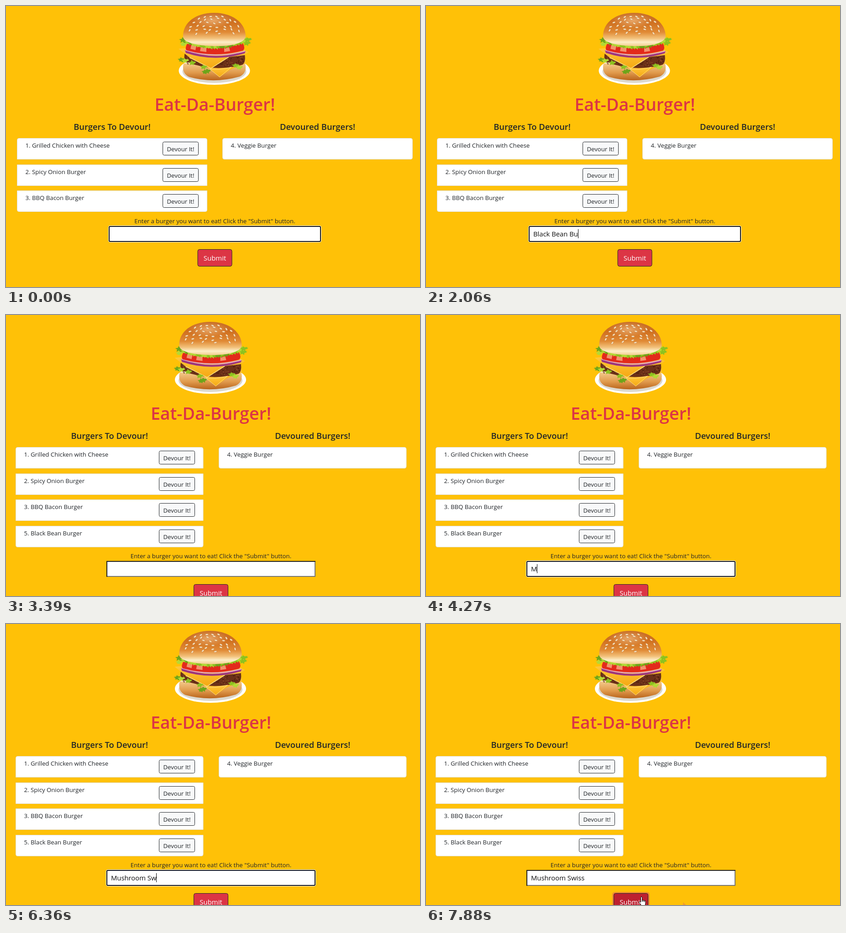
An HTML page that plays this animation: 907x617 px, repeating every 8 s.

```html
<!DOCTYPE html>
<html lang="en">
<head>
<meta charset="utf-8">
<title>Burger list</title>
<style>
  html, body { margin: 0; width: 100%; height: 100%; overflow: hidden; background: #ffc107; }
  svg { display: block; width: 907px; height: 617px; }
  text { font-family: "Open Sans", "Noto Sans", sans-serif; font-size: 13.2px; fill: #212529; white-space: pre; }
  .mid { text-anchor: middle; }
  .title { font-size: 37.5px; font-weight: 600; fill: #dc3545; }
  .head { font-size: 18.4px; font-weight: 600; }
  .typed { font-size: 14.8px; fill: #111; }
  .submit { font-size: 14.9px; fill: #fff; }
</style>
</head>
<body>
<svg id="stage" viewBox="0 0 907 617">
  <defs>
    <linearGradient id="crown" x1="0" y1="0" x2="0" y2="1">
      <stop offset="0" stop-color="#c8702a"/>
      <stop offset=".28" stop-color="#cf6f1f"/>
      <stop offset=".58" stop-color="#e08a35"/>
      <stop offset=".76" stop-color="#f2bf78"/>
      <stop offset=".88" stop-color="#fdeec8"/>
      <stop offset="1" stop-color="#f3cd8d"/>
    </linearGradient>
    <linearGradient id="heel" x1="0" y1="0" x2="0" y2="1">
      <stop offset="0" stop-color="#f3c98a"/>
      <stop offset=".55" stop-color="#e09a4c"/>
      <stop offset="1" stop-color="#b9641c"/>
    </linearGradient>
    <linearGradient id="cheese" x1="0" y1="0" x2="0" y2="1">
      <stop offset="0" stop-color="#ffc83c"/>
      <stop offset="1" stop-color="#f5a812"/>
    </linearGradient>
    <radialGradient id="glow">
      <stop offset="0" stop-color="#f3c089" stop-opacity=".7"/>
      <stop offset="1" stop-color="#f3c089" stop-opacity="0"/>
    </radialGradient>
    <g id="burger">
      <ellipse cx="456.5" cy="142" rx="78" ry="31" fill="#fff"/>
      <ellipse cx="456.5" cy="144" rx="70" ry="25" fill="#dcd8cd"/>
      <path d="M389 126Q384 148 402 156Q456 171 512 155Q529 147 524 126Z" fill="url(#heel)"/>
      <path d="M380 119L394 113H523L526 126L491 140L468 156L446 137L398 124Z" fill="url(#cheese)"/>
      <path d="M392 102Q388 120 396 123Q456 146 518 129Q527 122 522 102Z" fill="#6b3018"/>
      <g id="crumbs"/>
      <path d="M446 138L468 156L494 134Q470 141 446 138Z" fill="url(#cheese)" stroke="#ffe184"/>
      <path d="M378 94L396 92L520 95L532 101L522 108L488 112L449 137L402 113Z" fill="url(#cheese)"/>
      <path d="M402 113L449 137L488 112" fill="none" stroke="#ffe07a" stroke-width="1.5"/>
      <path d="M392 97Q456 121 525 99L523 104Q457 124 394 103Z" fill="#9c3580"/>
      <path d="M393 97Q456 117 524 99" fill="none" stroke="#dfa6cf" stroke-width="2"/>
      <path d="M397 82Q390 97 398 98Q457 114 519 98Q525 93 519 82Z" fill="#e32a1b"/>
      <path d="M404 94l11 3 2-9-11-2zM425 99l14 2V91l-12-1zM478 101l13-2-2-8-11 2z" fill="#f4916c"/>
      <g id="lettuce"/>
      <path d="M388 67C387 38 414 15 456 15S524 38 525 65C526 80 497 89 456 88S388 80 388 67Z" fill="url(#crown)"/>
      <ellipse cx="452" cy="32" rx="43" ry="16" fill="url(#glow)"/>
      <g id="seeds" fill="#f8e6c3" stroke="#b86a2a" stroke-width=".5"/>
    </g>
  </defs>
  <rect width="907" height="617" fill="#ffc107"/>
</svg>
<script>
const LOOP = 8000, SWITCH = 3390, FOCUS = 4100, PRESS = 7796;
const stage = document.getElementById('stage');
const clamp = v => Math.max(0, Math.min(1, v));

function add(parent, tag, attrs, text) {
  const el = document.createElementNS('http://www.w3.org/2000/svg', tag);
  for (const key in attrs) el.setAttribute(key, attrs[key]);
  if (text) el.textContent = text;
  parent.append(el);
  return el;
}
const show = (el, on) => el.setAttribute('visibility', on ? 'visible' : 'hidden');

let seed = 7;
const random = () => (seed = seed * 16807 % 2147483647) / 2147483647;
const around = (v, spread) => v + (random() - .5) * spread;

function garnishBurger() {
  const seeds = document.getElementById('seeds');
  [[22, 4, 24], [29, 6, 42], [37, 7, 51], [45, 8, 58], [53, 8, 60], [60, 4, 55]].forEach(([y, count, half]) => {
    for (let i = 0; i < count; i++) {
      const cx = around(456 + half * (2 * (i + .5) / count - 1), 5), cy = around(y, 5);
      add(seeds, 'ellipse', { cx, cy, rx: 3.4, ry: 1.7, transform: `rotate(${around((cx - 456) * .9, 70)} ${cx} ${cy})` });
    }
  });
  const crumbs = document.getElementById('crumbs');
  for (let i = 0; i < 90; i++) {
    const cx = around(457, 126), cy = around(120, 20) + 4 - Math.abs(cx - 457) * .08;
    add(crumbs, 'circle', { cx, cy, r: 1.2, fill: i % 2 ? '#8d4a2a' : '#4a1d0d' });
  }
  const lettuce = document.getElementById('lettuce');
  const leaf = (x, y, size) => {
    const points = [];
    for (let i = 0; i < 11; i++) {
      const a = i * Math.PI * 2 / 11, r = size * (i % 2 ? .55 : around(1, .4));
      points.push([x + r * Math.cos(a), y + r * .75 * Math.sin(a)]);
    }
    add(lettuce, 'polygon', { points: points.join(' '), fill: ['#8dc21f', '#6da51a', '#b3d935'][Math.floor(random() * 3)] });
  };
  for (let i = 0; i < 24; i++) {
    const k = i / 11.5 - 1;
    leaf(457 + 69 * k, 89 - 14 * k * k, 8.5);
  }
  [[529, 74], [527, 82], [388, 84], [384, 118], [392, 120], [408, 125], [433, 134], [441, 143], [436, 145], [503, 131], [511, 135]]
    .forEach(([x, y]) => leaf(x, y, 8));
}

function card(parent, x, y, w, top, bottom) {
  const h = 47, a = top ? 4 : 0, b = bottom ? 4 : 0;
  add(parent, 'path', {
    d: `M${x + .5} ${y + .5 + a}q0 ${-a} ${a} ${-a}h${w - 1 - 2 * a}q${a} 0 ${a} ${a}v${h - 1 - a - b}` +
       `q0 ${b} ${-b} ${b}h${2 * b + 1 - w}q${-b} 0 ${-b} ${-b}z`,
    fill: '#fff', stroke: '#dfdfdf'
  });
}

function buildPage(o) {
  const page = add(stage, 'g');
  const text = (x, y, cls, value) => add(page, 'text', { x, y, class: cls }, value);
  add(page, 'use', { href: '#burger', x: o.mid - 457.5 });
  text(o.mid, 229.5, 'mid title', 'Eat-Da-Burger!');
  text(o.left + o.width / 2, 272, 'mid head', 'Burgers To Devour!');
  text(o.right + o.width / 2, 272, 'mid head', 'Devoured Burgers!');
  o.items.forEach((item, i) => {
    const shift = Math.round(57.5 * i), y = 290 + shift;
    card(page, o.left, y, o.width, i === 0, i === o.items.length - 1);
    text(o.left + 18.5, y + 21, '', item);
    add(page, 'rect', { x: o.button + .5, y: y + 8.5, width: 78, height: 29, rx: 3, fill: '#f8f9fa', stroke: '#212529' });
    text(o.button + 39.5, y + 29, 'mid', 'Devour It!');
  });
  card(page, o.right, 290, o.width, true, true);
  text(o.right + 18.5, 311, '', '4. Veggie Burger');

  const { x, y, w } = o.input;
  text(o.mid, y - 6, 'mid', 'Enter a burger you want to eat! Click the "Submit" button.');
  add(page, 'rect', { x, y, width: w, height: 35, fill: '#fff' });
  const plain = add(page, 'g', { fill: 'none', 'stroke-width': 2 });
  add(plain, 'path', { d: `M${x} ${y + 34}h${w - 1}v-34`, stroke: '#767676' });
  add(plain, 'path', { d: `M${x + 1} ${y + 35}v-34h${w - 1}`, stroke: '#202020' });
  const ring = add(page, 'g', { fill: 'none' });
  add(ring, 'rect', { x: x - .5, y: y - .5, width: w + 1, height: 36, rx: 3.5, stroke: '#fff' });
  add(ring, 'rect', { x: x + 1, y: y + 1, width: w - 2, height: 33, rx: 2, stroke: '#101010', 'stroke-width': 2 });
  const typed = text(x + 10, y + 23, 'typed');
  const caret = add(page, 'rect', { y: y + 7, width: 1, height: 20 });

  const top = y + 51.5, glow = add(page, 'rect', {
    x: o.mid - 41, y: top - 3, width: 82, height: 44, rx: 6, fill: '#f08a34'
  });
  const submit = add(page, 'rect', { x: o.mid - 37.5, y: top, width: 75, height: 37, rx: 4, stroke: '#212529' });
  text(o.mid, y + 75.5, 'mid submit', 'Submit');
  return { page, plain, ring, typed, caret, glow, submit, start: x + 10 };
}

garnishBurger();
const items = ['1. Grilled Chicken with Cheese', '2. Spicy Onion Burger', '3. BBQ Bacon Burger'];
const before = buildPage({
  mid: 457.5, left: 24, right: 474, width: 417, button: 343, items, input: { x: 225, y: 483, w: 465 }
});
const after = buildPage({
  mid: 449, left: 21, right: 466, width: 411.5, button: 335,
  items: [...items, '5. Black Bean Burger'], input: { x: 220, y: 540, w: 458 }
});

const trace = add(stage, 'path', { d: 'M563 611L570 617H563Z', fill: '#f39a2c' });
const pointer = { fill: '#fff', stroke: '#000' };
const arrow = add(stage, 'path', { ...pointer, d: 'M0 0V16L4 12.5 6.5 18 9 17 6.5 11.5H11.5Z' });
const hand = add(stage, 'path', {
  ...pointer,
  d: 'M-1.5 1.5q0-1.5 1.5-1.5t1.5 1.5V8q1-1 2.5 0 1.5-1 2.5.5 2-.5 2.5 1.5v4q0 3-2 6H.5Q-2.5 15-5 12.5q-.8-2 1-2L-1.5 12ZM1.5 8v3M4 8v3M6.5 8.5v3'
});

// Times at which each letter arrives
const spread = (from, to, n) => Array.from({ length: n }, (_, i) => from + (to - from) * i / (n - 1));
const typing = {
  first: { word: 'Black Bean Burger', from: 150, keys: [...spread(270, 1140, 8), 1290, 1400, 1510, ...spread(1830, 2310, 4), 2620, 2690] },
  second: { word: 'Mushroom Swiss', from: FOCUS, keys: [...spread(4250, 5140, 7), 5440, 5750, 6130, 6360, 6530, 6660, 6800] }
};
const ruler = document.createElement('canvas').getContext('2d');
ruler.font = '14.8px "Open Sans", "Noto Sans", sans-serif';

function drawInput(view, { word, from, keys }, t, focused) {
  const done = keys.filter(k => k <= t), value = word.slice(0, done.length);
  const last = done.length ? done[done.length - 1] : from;
  view.typed.textContent = value;
  view.caret.setAttribute('x', Math.round(view.start + ruler.measureText(value).width));
  show(view.caret, focused && t >= from && t - last < 540);
  show(view.ring, focused);
  show(view.plain, !focused);
}

function drawPointer(t) {
  const step = Math.floor((t - 7126) / 84) * 84;
  const p = clamp(step / 588), eased = p * p * (3 - 2 * p);
  const x = 563 - 91 * eased, y = 611 - 12 * eased;
  const visible = t >= 7140, over = visible && x < 487;
  for (const el of [arrow, hand]) el.setAttribute('transform', `translate(${Math.round(x)} ${Math.round(y)})`);
  show(arrow, visible && !over);
  show(hand, over);
  show(trace, t >= 7210);
  return over;
}

function render(t) {
  const view = t < SWITCH ? before : after;
  before.page.style.display = view === before ? '' : 'none';
  after.page.style.display = view === after ? '' : 'none';
  const pressed = t >= PRESS, over = drawPointer(t);
  if (view === before) drawInput(view, typing.first, t, true);
  else drawInput(view, typing.second, t, t >= FOCUS && !pressed);
  show(view.glow, pressed);
  view.submit.setAttribute('fill', pressed ? '#bd2130' : over ? '#c82333' : '#dc3545');
}

const begin = performance.now();
function tick() {
  render((performance.now() - begin) % LOOP);
  requestAnimationFrame(tick);
}
tick();
</script>
</body>
</html>
```
